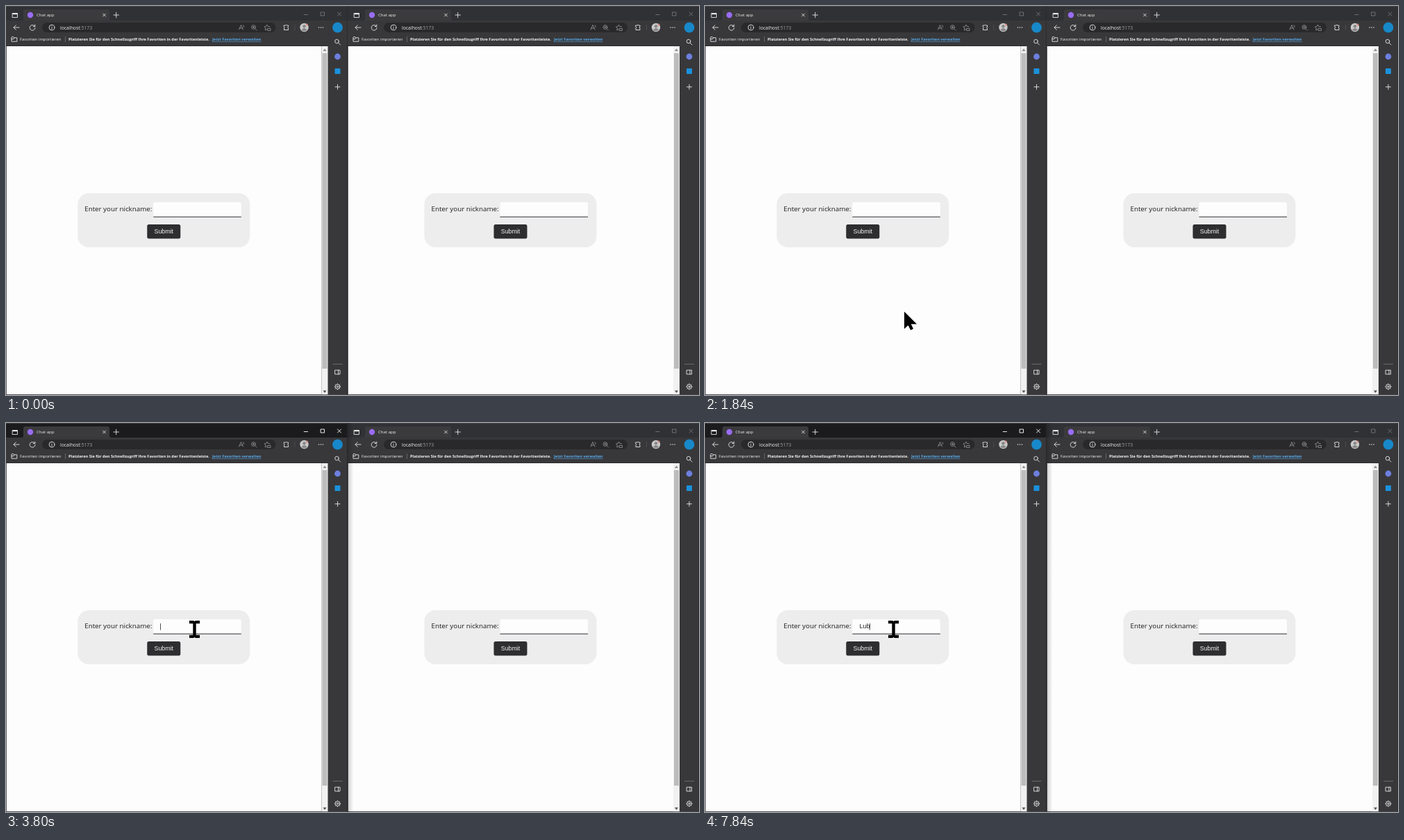
An HTML page for the animation above (8000 ms loop, 998 by 561 pixels).

```html
<!DOCTYPE html>
<html lang="en">
<head>
<meta charset="utf-8">
<title>Chat app</title>
<style>
  html, body { margin: 0; width: 100%; height: 100%; overflow: hidden; background: #2d2d30; }
  svg { display: block; width: 998px; height: 561px; }
  text { font-family: "Open Sans", "Noto Sans", sans-serif; fill: #f2f2f2; }
  .ui { font-family: "Liberation Sans", Arial, sans-serif; }
  .line { fill: none; stroke: #e6e6e6; stroke-width: .9; stroke-linecap: round; stroke-linejoin: round; }
  .dim { stroke: #9a9a9a; stroke-width: .8; }
  .controls { stroke: #77777a; }
  .active .controls { stroke: #fff; }
  .bar { fill: #303135; }
  .active .bar { fill: #1b1b1d; }
</style>
</head>
<body>
<svg id="stage" viewBox="0 0 998 561"></svg>
<script>
const LOOP = 8000;
const stage = document.getElementById('stage');

const label = (x, y, size, text, extra = '') =>
  `<text x="${x}" y="${y}" font-size="${size}" ${extra}>${text}</text>`;
const rect = (x, y, w, h, fill, rx = 0) =>
  `<rect x="${x}" y="${y}" width="${w}" height="${h}" rx="${rx}" fill="${fill}"/>`;
const line = (d, cls = '') => `<path class="line ${cls}" d="${d}"/>`;
const ring = (x, y, r, cls = '') => `<circle class="line ${cls}" cx="${x}" cy="${y}" r="${r}"/>`;
const dot = (x, y, r, fill) => `<circle cx="${x}" cy="${y}" r="${r}" fill="${fill}"/>`;
const shift = (x, body) => `<g transform="translate(${x} 0)">${body}</g>`;

function tabAndAddress(fieldWidth) {
  return `<path d="M22 21Q25 21 25 18V8Q25 5 28 5H146Q149 5 149 8V18Q149 21 152 21Z" fill="#3b3b3d"/>`
    + line('M9.5 10.5H16.5V16.5H9.5Z') + rect(9.5, 10, 7, 2.2, '#e6e6e6')
    + dot(35, 13, 4.2, '#9a6cf5')
    + label(44, 15.3, 6.1, 'Chat app')
    + line('M139.6 11.1l3.8 3.8M143.4 11.1l-3.8 3.8')
    + line('M155 13H162.4M158.7 9.3V16.7')
    + line('M11 31H19M14.3 27.7L11 31L14.3 34.3')
    + line('M41.4 29.2A3.9 3.9 0 1 0 42 31.5M41.8 27V29.5H39.2')
    + rect(52, 24, fieldWidth, 14, '#29292b', 7)
    + ring(66, 31, 3.9) + line('M66 30.7V33M66 29V29.1')
    + label(78, 33.5, 6.85, 'localhost<tspan fill="#a0a0a0">:5173</tspan>')
    + line('M8 45.5V51.2H15.8V45.8H11.8L10.8 44.6H8.8ZM8 47.6H11L12 45.8')
    + label(20, 50.3, 5.84, 'Favoriten importieren')
    + rect(85, 44, .8, 8, '#707070')
    + label(90, 50.3, 5.6, 'Platzieren Sie für den Schnellzugriff Ihre Favoriten in der Favoritenleiste.', 'font-weight="700"')
    + label(297, 50.3, 5.58, 'Jetzt Favoriten verwalten', 'font-weight="700" style="fill:#59a9e8;text-decoration:underline"');
}

function gear() {
  let teeth = '';
  for (let a = 0; a < 360; a += 45) {
    teeth += `<path class="line" d="M477 545.6V544.8" transform="rotate(${a} 477 549)"/>`;
  }
  return ring(477, 549, 3.4) + ring(477, 549, 1.2) + teeth;
}

function toolsAndSidebar() {
  return line('M428.7 12.5H434M453 9H458V14H453ZM477 9L482 14M482 9L477 14', 'controls')
    + line('M335 34L338 27.5L341 34M336 32H340M341 27.5Q343 28.5 342 30.5', 'dim')
    + ring(356, 30.5, 2.9, 'dim') + line('M358.2 32.7L360.5 35M354.7 30.5H357.3M356 29.2V31.8', 'dim')
    + line('M375 33.7L372.8 35L373.4 32L371.4 30L374.1 29.6L375.5 27L376.9 29.6L379.6 30', 'dim')
    + line('M376.5 32.5H380.5V35.5H376.5Z', 'dim')
    + line('M400 28H402Q403 26 404 28H406V30Q404 31 406 32V34.5H400V32Q402 31 400 30Z')
    + rect(415, 27, .7, 8, '#555')
    + dot(429, 31, 6.2, '#c9c9c9') + dot(429, 29.2, 2.2, '#868686')
    + '<path d="M424.8 34.5Q429 29.5 433.2 34.5Q429 38 424.8 34.5Z" fill="#868686"/>'
    + dot(433, 27, 1.5, '#dc8b83')
    + [450, 453, 456].map(x => dot(x, 31, .75, '#eee')).join('')
    + rect(454, 58, 9, 503, '#f1f1f1') + rect(455, 68, 7, 455, '#bdbdbd')
    + '<path d="M456 65L458.5 61.5L461 65Z" fill="#8b8b8b"/><path d="M456 554.5L458.5 558L461 554.5Z" fill="#505050"/>'
    + dot(477, 31, 7.4, '#1788c9')
    + ring(476, 51, 2.8) + line('M478.2 53.2L481 56')
    + dot(477, 73, 4.4, '#6d7fe0')
    + rect(473, 90, 8, 8, '#1b91dc', .8)
    + line('M473.5 116.7H480.5M477 113.2V120.2')
    + rect(470, 516, 14, .8, '#77777a')
    + line('M473.5 525.2H480.5V531H473.5ZM478 525.2V531')
    + gear();
}

const form = rect(103, 270, 248, 78, '#ededee', 16)
  + label(113, 296.2, 9.77, 'Enter your nickname:', 'style="fill:#1a1a1a"')
  + rect(212, 283, 126.5, 22, '#fdfdfd', 2) + rect(212, 303.6, 126.5, 1.1, '#3c3c42')
  + rect(203, 315, 48, 20.5, '#2e2e31', 2.5)
  + label(227, 328, 8.85, 'Submit', 'class="ui" text-anchor="middle"');

function browser(id, left, width) {
  const extra = width - 491;
  return `<g id="${id}">` + shift(left,
    rect(0, 0, width, 561, '#38383b')
    + `<rect class="bar" width="${width}" height="21"/>` + rect(0, 0, width, .8, '#46464a')
    + tabAndAddress(336 + extra)
    + rect(.8, 58, 453.2 + extra, 502.2, '#fdfdfd')
    + rect(0, 57.2, 463 + extra, .8, '#2a2a2c')
    + shift(extra, toolsAndSidebar())
    + shift(extra / 2, form)
    + rect(0, 560.2, width, .8, '#4b4b4e')
    + rect(width - .6, 0, .6, 561, '#29292b')) + '</g>';
}

stage.innerHTML = `<defs><linearGradient id="shade">
    <stop stop-color="#000" stop-opacity=".2"/><stop offset="1" stop-color="#000" stop-opacity="0"/>
  </linearGradient></defs>`
  + browser('first', 0, 491.5)
  + browser('second', 492, 506)
  + '<rect id="shadow" x="491.5" width="9" height="561" fill="url(#shade)"/>'
  + label(222.5, 296.3, 9, '', 'id="typed" class="ui" style="fill:#222"')
  + '<rect id="caret" y="289" width=".8" height="9.6" fill="#222"/>'
  + '<path id="arrow" d="M0 0V25L5.6 19.8L9.2 26.6L13 24.8L9.8 17.9H18Z"/>'
  + '<path id="beam" d="M-7.5-12H-1.5L0-11L1.5-12H7.5V-7.8H2.2V8.8H7.5V13H1.5L0 12L-1.5 13H-7.5V8.8H-2.2V-7.8H-7.5Z"/>';

// Pointer path: time, x, y
const path = [
  [600, 998, 462], [820, 733, 435], [860, 325, 402], [1120, 253, 335],
  [1380, 300, 465], [1560, 342, 490], [1660, 335, 484], [1840, 287, 441],
  [2060, 276, 402], [2300, 290, 356], [2480, 297, 364], [2640, 284, 333],
  [2960, 274, 306], [3240, 272.5, 297.5], [3340, 272.5, 297.5], [3360, 271.5, 297]
];
// Typed text: time, text, caret x
const typing = [[0, '', 222.5], [6140, 'L', 227.3], [6600, 'Lu', 232.3], [7300, 'Lub', 237.3]];

const part = Object.fromEntries(
  ['first', 'shadow', 'typed', 'caret', 'arrow', 'beam'].map(id => [id, document.getElementById(id)]));
const show = (el, on) => el.setAttribute('visibility', on ? 'visible' : 'hidden');

function pointerAt(t) {
  const next = path.findIndex(p => p[0] > t);
  if (next < 0) return path[path.length - 1].slice(1);
  if (next === 0) return [-50, -50];
  const [t0, x0, y0] = path[next - 1], [t1, x1, y1] = path[next];
  const k = (t - t0) / (t1 - t0);
  return [x0 + (x1 - x0) * k, y0 + (y1 - y0) * k];
}

function draw(t) {
  const [x, y] = pointerAt(t);
  const overInput = x > 212 && x < 339 && y > 283 && y < 305;
  for (const el of [part.arrow, part.beam]) el.setAttribute('transform', `translate(${x} ${y})`);
  show(part.arrow, t >= 600 && !overInput);
  show(part.beam, overInput);

  const focused = t >= 3500;
  part.first.classList.toggle('active', focused);
  show(part.shadow, focused);

  const [, text, caretX] = typing.filter(s => s[0] <= t).pop();
  part.typed.textContent = text;
  part.caret.setAttribute('x', caretX - .4);
  const fade = t < 6140 ? Math.min(1, Math.max(0, (5040 - t) / 160)) : 1;
  part.caret.setAttribute('opacity', focused ? fade : 0);
}

const start = performance.now();
function tick() {
  draw((performance.now() - start) % LOOP);
  requestAnimationFrame(tick);
}
tick();
</script>
</body>
</html>
```
